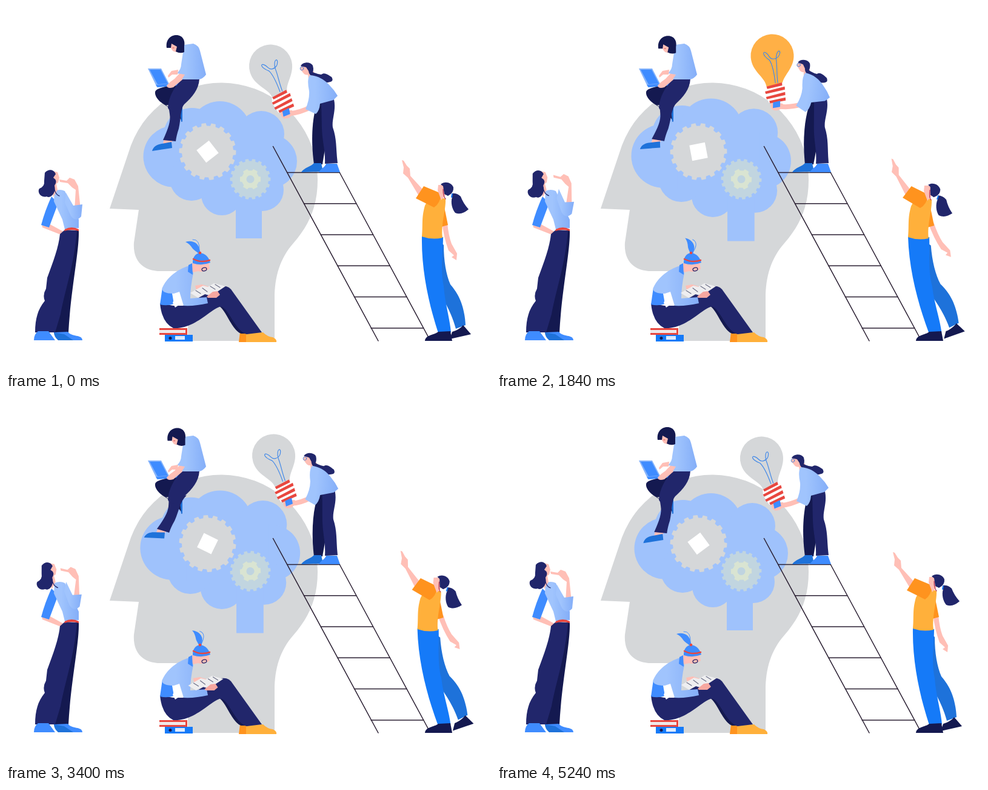
Recreate the animation shown at these times as an HTML page. Size 800 px wide and 600 px high, loop 5.28 s.

```html
<!DOCTYPE html>
<html lang="en">
<head>
<meta charset="utf-8">
<title>Ideas at work</title>
<style>
html, body { margin: 0; width: 100%; height: 100%; overflow: hidden; background: #fff; }
svg { display: block; width: 800px; height: 600px; }
.grey { fill: #d5d7d9; } .brain { fill: #9fc2fc; } .navy { fill: #21266b; } .dark { fill: #141950; }
.skin { fill: #ffbfb6; } .blue { fill: #3f8cff; } .deep { fill: #1e72da; } .jeans { fill: #157af8; }
.gold { fill: #ffb03b; } .orange { fill: #ff931e; } .red { fill: #e8473f; } .white { fill: #fff; }
.shirt { fill: url(#shirt); }
.line { fill: none; stroke-linecap: round; stroke-linejoin: round; }
</style>
</head>
<body>
<svg viewBox="0 0 800 600">
<defs>
  <linearGradient id="shirt"><stop offset=".3" stop-color="#a0c4fd"/><stop offset="1" stop-color="#84aef8"/></linearGradient>
</defs>

<!-- head, brain and gears -->
<path class="grey" d="M171 334L206 230A159 159 0 0 1 514 287C514 327 502 359 474 391C452 416 443 446 443 482V552H300V437H255C226 437 209 420 211 390L219 336Z"/>
<g id="brain" class="brain">
  <circle cx="277" cy="248" r="50.5"/><circle cx="307" cy="216" r="48"/><circle cx="353" cy="208" r="51"/>
  <circle cx="421" cy="211" r="38"/><circle cx="436" cy="256" r="44"/><circle cx="423" cy="303" r="35"/>
  <circle cx="356" cy="311" r="34"/><circle cx="306" cy="285" r="36"/><path d="M300 210H430V300H300ZM379 300H422V383H379Z"/>
</g>
<g id="bigGear"><path id="bigTeeth" class="grey"/><path class="white" d="M-13 -13H13V13H-13Z"/></g>
<g id="smallGear"><path id="smallTeeth" fill="#c1d5e0"/><path id="core" fill="#d9e4d2"/><circle r="6.5" fill="#bfd4e0"/></g>
<path class="line" id="ladder" stroke="#2b2033" stroke-width="1.5"/>

<!-- reader on the head with a laptop -->
<path class="dark" d="M312 122L286 127C268 133 247 134 246 142C245 150 255 160 264 164L291 178V191C284 179 272 169 263 164C284 160 305 146 312 122Z"/>
<path class="deep" d="M287 171L291 166V190L289 191Z"/>
<path fill="#86b4fb" d="M234 103L256 103L269 128L287 126L285 130L249 134Z"/>
<path class="blue" d="M237 105L255 105L267 128L250 129Z"/>
<path class="blue" d="M247 130L287 127L285 131L250 134Z"/>
<g id="shin">
  <path class="skin" d="M261 218L275 219L273 227L259 227Z"/>
  <path class="navy" d="M268 164L296 157C287 170 289 184 285 202Q281 214 280 223L259 221C268 201 272 190 270 178Z"/>
  <path class="deep" d="M241 239C243 231 250 228 257 227L273 224L274 234Z"/>
</g>
<path class="navy" d="M290 121L319 120C318 138 307 150 294 162L287 171Q272 178 267 168C268 150 277 134 290 121Z"/>
<path class="skin" d="M291 106L302 112L276 134Q266 137 265 131Q270 125 278 120Z"/>
<path class="shirt" d="M294 64L309 62Q318 65 320 74L330 113Q325 120 318 121H290L295 113L282 111Q289 104 289 96Z"/>
<path id="typing" class="skin" d="M284 105L283 113L274 113L268 118L267 115L273 107Z"/>
<g id="topHead">
  <path class="skin" d="M272 62H289V75Q276 78 273 71L271 68Z"/>
  <path class="dark" d="M265 69C263 55 272 48 281 48C292 48 296 58 294 66V76Q287 79 280 75L282 67L273 62L272 69Z"/>
  <path class="line" d="M275 69H277" stroke="#d54a50"/>
</g>

<!-- woman on the ladder -->
<g id="climbLegs">
  <path class="dark" d="M514 158H532L527 230L522 261H508C503 225 504 185 514 158Z"/>
  <path class="navy" d="M520 158L541 154C545 172 537 187 539 200C546 220 544 235 547 259L526 260C527 238 522 226 521 202Z"/>
</g>
<path class="deep" d="M487 274C492 266 503 265 508 259H520L523 273Z"/>
<path class="blue" d="M516 274C520 267 526 266 528 260H546L551 274Z"/>
<path id="arm" class="line" stroke="#ffbfb6" stroke-width="8"/>
<g id="bulb">
  <path class="skin" d="M-6 76Q-11 84 -5 89Q4 93 11 86L12 80Z"/>
  <path id="glass" d="M-13 50C-14 34 -35.5 24 -35.5 0A35.5 35.5 0 1 1 35.5 0C35.5 24 14 34 13 50Z"/>
  <path class="line" stroke="#4389e8" stroke-width="1.2" d="M2 45C1 25 -1 14 -5 7C-10 3 -14 -1 -14 -5C-13 -9 -8 -5 -5 1C-2 7 5 6 9 3C13 -1 14 -6 12 -7C9 -7 6 -1 6 7C7 18 5 30 6 45"/>
  <path class="white" d="M-14 51L14 45L18 52L17 74L-11 77L-16 59Z"/>
  <path class="red" d="M-13 50L13 45V50L-12 54ZM-16 58L17 52V57L-15 62ZM-15 67L17 61V66L-14 71ZM-10 74L17 70V75L-9 78Z"/>
  <path class="blue" d="M-4 77L8 75L7 85L-5 86Z"/>
</g>
<g id="climber">
  <path class="skin" d="M497 106L508 108L509 120H499Z"/>
  <path class="navy" d="M501 106Q510 112 520 113C526 108 533 115 537 117Q541 123 535 125C520 130 514 120 502 114Z"/>
  <path class="shirt" d="M501 114C515 115 525 121 534 131Q542 139 547 148L540 155L518 161Q517 173 511 178L494 170Q501 154 500 140Q496 121 501 114Z"/>
  <path class="skin" d="M488 97L500 98L503 112Q494 116 490 110L485 104Z"/>
  <path class="navy" d="M486 99C489 92 502 91 506 98Q509 108 503 114Q500 113 499 107L495 101Z"/>
  <circle class="line" cx="488" cy="103" r="2.8" stroke="#4b82d8" stroke-width=".9"/>
</g>

<!-- thinker on the left -->
<path class="skin" d="M59 357L71 359L93 371Q100 371 99 377L88 376L60 365Z"/>
<path class="blue" d="M75 314L86 325L71 365L58 361Q64 338 75 314Z"/>
<path class="dark" d="M102 370H120C121 405 107 465 103 538H79Z"/>
<path class="navy" d="M97 369L117 370C113 425 98 465 90 508L81 538H48C48 515 53 499 64 486Q60 476 66 466L68 448C78 421 87 397 89 376Z"/>
<path class="blue" d="M46 551Q46 541 53 536H70L81 551ZM79 538L102 537C108 546 126 541 126 551H86Z"/>
<path class="deep" d="M79 538L96 541L111 551H86Q79 545 79 538Z"/>
<path class="shirt" d="M80 305Q89 301 97 305L120 352V366L97 368L93 352L79 322Z"/>
<g id="forearm">
  <path class="skin" d="M88 286L100 288L105 283L113 286L119 297L123 335L113 337L115 303L109 299L102 292L89 290Z"/>
  <path class="shirt" d="M99 308L111 329L126 327L124 347Q115 357 107 346L97 324Z"/>
</g>
<path class="red" d="M97 368Q108 362 120 368V371Q108 367 96 371Z"/>
<g id="thinkHead">
  <path class="skin" d="M77 272L85 274L88 283L86 291L83 293L85 303L78 315Q76 304 76 292Z"/>
  <path class="navy" d="M64 275C70 268 79 269 82 277L78 283Q86 288 80 296C83 308 74 318 67 314C57 317 51 306 55 301Q64 298 63 288Z"/>
  <path class="line" d="M79 298Q81 311 88 313" stroke="#21266b" stroke-width="1.3"/>
</g>

<!-- seated reader -->
<path class="red" d="M253 531H299V542H253Z"/><path fill="#f0e8e8" d="M253 534H296V539H253Z"/>
<path class="jeans" d="M262 542H308V553H262Z"/><path fill="#dcebff" d="M279 544H295V550H279Z"/><circle class="dark" cx="271" cy="547.5" r="2.5"/>
<path class="orange" d="M386 538H404V554H384Z"/>
<path class="gold" d="M396 540L424 538Q431 545 440 546Q447 549 446 554H396Z"/>
<path class="dark" d="M345 494C360 489 370 534 388 540H402L365 475Z"/>
<path class="navy" d="M254 490L276 494L292 494C315 484 339 467 355 462Q368 460 374 471L422 538L397 541C376 535 366 492 352 496C335 502 310 533 276 531Q257 522 254 490Z"/>
<path class="blue" d="M258 464L273 468L277 491Q265 495 254 492Z"/>
<path class="skin" d="M307 424L334 422L336 433Q326 440 317 437L304 440Z"/>
<path class="shirt" d="M303 428C288 432 268 443 258 464Q255 474 277 474L286 471L293 494Q312 495 333 490L331 480L304 482Q304 464 309 440Z"/>
<path class="blue" d="M301 427L307 424L308 443L300 438Z"/>
<path class="white" d="M281 476L286 482L288 491L279 497L275 489Z"/>
<g id="book">
  <path class="skin" d="M312 461L323 459L336 463L341 470L315 472Z"/>
  <path fill="#eeeef0" d="M304 473L325 461L333 463L343 457L362 462L338 478L328 475L317 481Z"/>
  <path class="line" d="M313 469L321 474M324 465L332 471M337 462L345 467M345 459L353 464" stroke="#6c6f86" stroke-width="1.2"/>
  <path fill="#f7a7a0" d="M331 479L341 471L349 470L353 476L347 481H333Z"/>
</g>
<g id="tail">
  <path class="blue" d="M318 408C313 404 311 403 308 400Q302 391 296 389C306 385 318 390 319 401L321 407Z"/>
  <path class="line" d="M308 385Q320 384 319 403" stroke="#3f8cff" stroke-width=".9"/>
</g>
<path class="blue" d="M308 421C309 411 315 407 321 407Q333 409 337 423Q323 429 308 424Z"/>
<path class="line" d="M309 417Q322 424 336 419" stroke="#e8473f" stroke-width="2.5"/><circle class="red" cx="320" cy="407" r="2.3"/>
<ellipse class="line" cx="327" cy="434" rx="4" ry="2.7" transform="rotate(-15 327 434)" stroke="#21266b" stroke-width="1.3"/>

<!-- pointing woman -->
<g id="backLeg">
  <path class="deep" d="M712 385L722 394C722 420 726 443 733 459C745 473 756 491 758 526L742 532C736 510 727 493 717 476Z"/>
  <path class="dark" d="M732 549L736 537C744 535 751 530 754 526L767 541Z"/>
</g>
<path id="frontLeg" class="jeans" d="M686 380L721 381C721 405 716 435 722 462C724 490 732 515 734 538L713 539C698 493 685 437 686 380Z"/>
<path class="dark" d="M691 552C692 542 705 543 713 537L733 536L736 552Z"/>
<g id="pointer">
  <path id="hanging" class="skin" d="M719 355L728 358Q730 379 735 392L744 408L743 419L735 414L739 411L730 403Q722 382 719 355Z"/>
  <path class="orange" d="M720 319Q725 340 729 361L718 364L714 340Z"/>
  <path class="gold" d="M701 310L725 318C726 335 717 360 720 382Q703 386 686 380C688 360 685 350 691 329Z"/>
  <g id="pointing">
    <path class="skin" d="M653 254L656 255L661 263L666 268L667 280L688 303L681 313L663 283L655 276L656 266Z"/>
    <path class="orange" d="M689 297L718 309Q716 326 706 332L676 317Z"/>
  </g>
  <path class="skin" d="M713 295L724 295L725 312L718 320L715 312L712 304Z"/>
  <g id="rightHair">
    <path class="navy" d="M735 309Q744 308 750 314Q754 325 763 335C756 341 749 344 741 341C736 335 733 324 736 315Z"/>
    <path class="line" d="M736 310L735 315" stroke="#157af8" stroke-width="2"/>
    <path class="navy" d="M717 294C724 288 735 291 738 299Q739 308 729 313L723 310L721 297Z"/>
    <path class="line" d="M721 302Q721 314 725 318" stroke="#b62e4f" stroke-width="1.2"/>
  </g>
</g>
</svg>
<script>
const LOOP = 5280, STEP = 40;
const KEYS = [0, 1080, 1840, 2480, 3400, 4080];
const STEPS = [0, 760, 1080, 1440, 1840, 2480];
const $ = id => document.getElementById(id);
const move = (id, transform) => $(id).setAttribute('transform', transform);
const clamp = x => Math.max(0, Math.min(1, x));

// Smooth periodic curve through values given at the key times.
function curve(t, values, times = KEYS, period = LOOP) {
  const n = times.length;
  t %= period;
  const time = i => times[(i + n) % n] + Math.floor(i / n) * period;
  const value = i => values[(i + n) % n];
  const slope = i => (value(i + 1) - value(i - 1)) / (time(i + 1) - time(i - 1));
  let i = n - 1;
  while (times[i] > t) i--;
  const span = time(i + 1) - time(i), u = (t - time(i)) / span, v = 1 - u;
  return v * v * (1 + 2 * u) * value(i) + u * u * (3 - 2 * u) * value(i + 1)
    + span * u * v * (v * slope(i) - u * slope(i + 1));
}

function gear(teeth, outer, inner, phase = 0) {
  let d = '';
  for (let i = 0; i < teeth; i++)
    [[-.3, inner], [-.22, outer], [.22, outer], [.3, inner]].forEach(([offset, r]) => {
      const a = (i + phase + offset) * 2 * Math.PI / teeth;
      d += (d ? 'L' : 'M') + r * Math.cos(a) + ' ' + r * Math.sin(a);
    });
  return d + 'Z';
}

$('bigTeeth').setAttribute('d', gear(18, 47, 42.5, .5));
$('smallTeeth').setAttribute('d', gear(18, 33.5, 30));
$('core').setAttribute('d', gear(6, 17.5, 14.5));

let rails = 'M440.5 231.5L614 552M550 274L699 550';
for (let i = 0; i < 6; i++) rails += `M${463.5 + 27.7 * i} ${274.4 + 51.3 * i}h87`;
$('ladder').setAttribute('d', rails);

function draw(t) {
  const breath = (1 - Math.cos(2 * Math.PI * t / LOOP)) / 2;
  move('brain', `translate(353 270) scale(${1 + .05 * breath}) translate(-353 -270)`);
  const turn = 180 * t / LOOP;
  move('bigGear', `translate(332.5 240) rotate(${52 - turn})`);
  move('smallGear', `translate(403 285.5) rotate(${turn})`);

  const swing = curve(t, [1, .05, 0, .08, .65, .98], STEPS, LOOP / 2);
  move('shin', `rotate(${12 * (1 - swing)} 280 168)`);
  const nod = curve(t, [0, 1, 1.5, 1.7, 2, 1]);
  move('topHead', `translate(${nod * .8} ${nod * .8})`);
  move('typing', `translate(0 ${curve(t, [0, 5, 0, 5, 5, 3])})`);

  const lean = curve(t, [0, .5, .95, 1, .5, .15]);
  move('climber', `translate(${lean} 0) rotate(${9.3 * lean} 530 156)`);
  move('climbLegs', `translate(${8 * lean} 0) skewX(${-1.75 * lean})`);
  const bx = curve(t, [436.5, 443.5, 454, 455, 441.5, 437.5]);
  const by = curve(t, [99, 96, 82, 80, 95, 99]);
  const angle = curve(t, [-17.5, -17.5, -4, -3, -17, -17.5]);
  move('bulb', `translate(${bx} ${by}) rotate(${angle})`);
  const lit = clamp((t - 1400) / 120) * clamp((3000 - t) / 120);
  $('glass').style.fill = `color-mix(in srgb, #ffb046 ${100 * lit}%, #d5d7d9)`;
  const a = angle * Math.PI / 180;
  const hx = bx + 5 * Math.cos(a) - 84 * Math.sin(a), hy = by + 84 * Math.cos(a) + 5 * Math.sin(a);
  const sx = 504 - 2 * lean, sy = 166 - 4 * lean;
  $('arm').setAttribute('d', `M${sx} ${sy}Q${(sx + hx) / 2} ${(sy + hy) / 2 + 4} ${hx} ${hy}`);

  const think = curve(t, [0, .3, 1, .95, 1, .65]);
  move('thinkHead', `translate(${-3.5 * think} 0) rotate(${-4 * think} 82 300)`);
  const lift = curve(t, [0, .2, 1, .9, .75, .6]);
  move('forearm', `translate(${curve(t, [0, 0, 0, 0, -2, -1])} ${-5 * lift}) rotate(${5 * lift} 118 340)`);

  const flick = curve(t, [0, .47, 1, .95, .8, .42]);
  move('tail', `translate(${2 * flick} ${3 * flick}) rotate(${30 * flick} 320 407)`);
  move('book', `translate(${curve(t, [0, 0, -1, -2, -3.5, -3.5])} ${curve(t, [0, 0, 0, 0, 1, 1])})`);

  const sway = curve(t, [0, .75, 1, 1, .93, .65]);
  const shear = 8 * sway / 172, kick = .075 * sway, rise = .12 * sway;
  move('pointer', `translate(${-8 * sway} ${sway})`);
  move('frontLeg', `matrix(1 0 ${shear} 1 ${-552 * shear} 0)`);
  move('backLeg', `matrix(1 ${-rise} ${kick} 1 ${-478 * kick} ${728 * rise})`);
  move('hanging', `rotate(${-13 * sway} 722 355)`);
  move('pointing', `translate(${sway} 0) rotate(${4 * sway} 704 318)`);
  move('rightHair', `translate(${sway} ${sway}) rotate(${8 * sway} 726 302)`);
}

function frame(now) {
  draw(Math.floor(now % LOOP / STEP) * STEP);
  requestAnimationFrame(frame);
}
draw(0);
requestAnimationFrame(frame);
</script>
</body>
</html>
```
